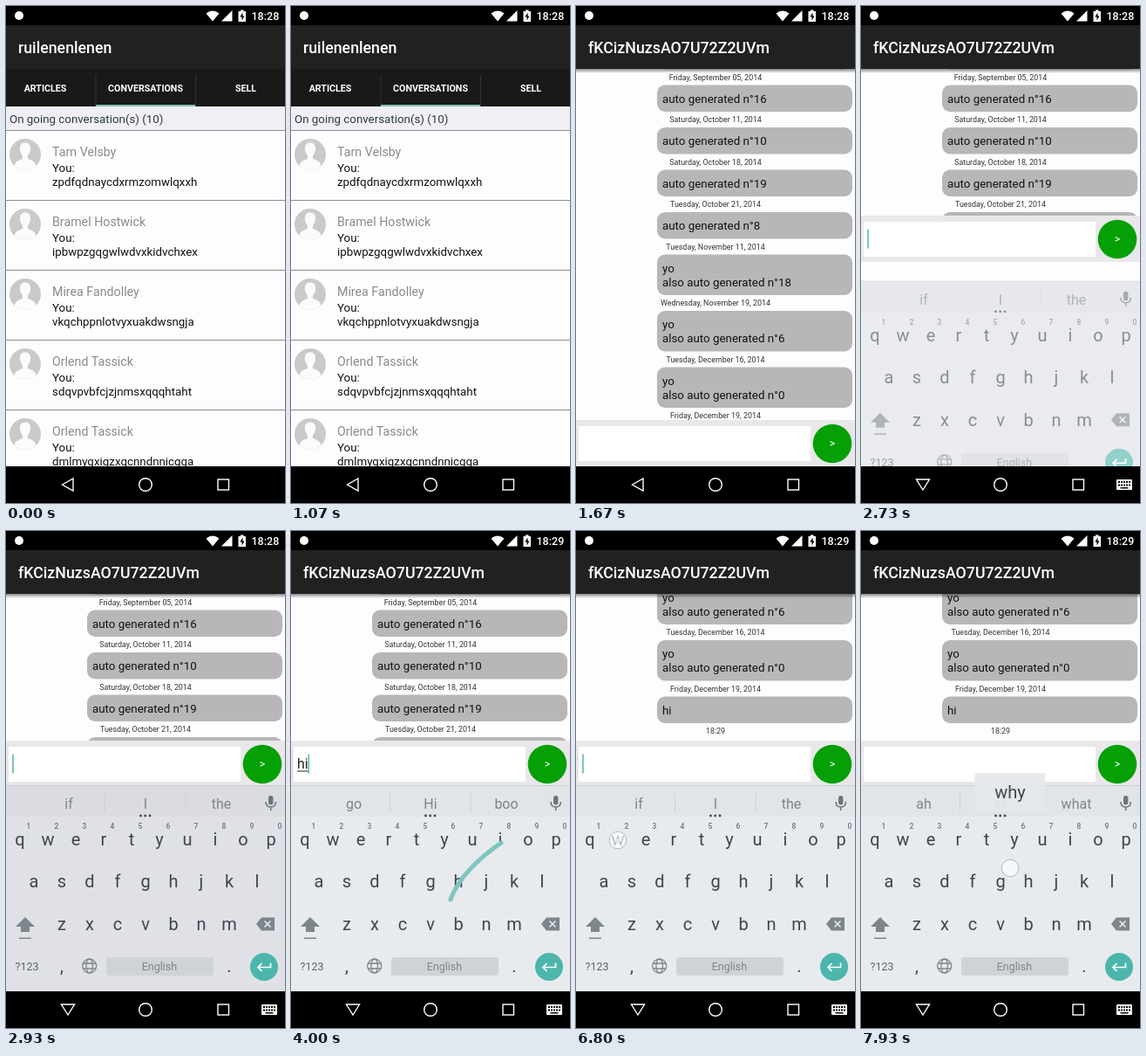
These frames come from a looping animation (320x569 px, 8000 ms). An HTML page:

```html
<!DOCTYPE html>
<html lang="en">
<head>
<meta charset="utf-8">
<title>Chat</title>
<style>
html, body { margin: 0; width: 100%; height: 100%; overflow: hidden; background: #000; }
svg { display: block; width: 100vw; height: 100vh; font-family: Roboto, sans-serif; }
.mid { text-anchor: middle; }
.title { font-size: 17.78px; font-weight: 500; fill: #fff; }
.tab { font-size: 10.67px; font-weight: 700; fill: #fff; text-anchor: middle; }
.msg { font-size: 13.33px; fill: #111; }
.name { font-size: 14.22px; fill: #8b8b8b; }
.date { font-size: 8.89px; fill: #333; text-anchor: middle; }
.key { font-size: 20px; fill: #3b474e; text-anchor: middle; }
.digit { font-size: 8.5px; font-weight: 500; fill: #69757b; text-anchor: middle; }
.word { font-size: 16px; fill: #7b858b; text-anchor: middle; }
.line { fill: none; stroke: #fff; stroke-width: 1.4; }
</style>
</head>
<body>
<svg id="stage" viewBox="0 0 320 569" preserveAspectRatio="none"></svg>
<script>
(() => {
const LOOP = 8000;
const stage = document.getElementById('stage');

const rect = (x, y, w, h, fill, r = 0, more = '') =>
  `<rect x="${x}" y="${y}" width="${w}" height="${h}" rx="${r}" fill="${fill}" ${more}/>`;
const text = (x, y, cls, s, more = '') => `<text x="${x}" y="${y}" class="${cls}" ${more}>${s}</text>`;
const path = (d, more) => `<path d="${d}" ${more}/>`;
const circle = (x, y, r, more) => `<circle cx="${x}" cy="${y}" r="${r}" ${more}/>`;

// Conversation list
const people = [
  ['Tarn Velsby', 'zpdfqdnaycdxrmzomwlqxxh'],
  ['Bramel Hostwick', 'ipbwpzgqgwlwdvxkidvchxex'],
  ['Mirea Fandolley', 'vkqchppnlotvyxuakdwsngja'],
  ['Orlend Tassick', 'sdqvpvbfcjzjnmsxqqqhtaht'],
  ['Orlend Tassick', 'dmlmyqxiqzxgcnndnnicgga']
];

function person([name, msg], i) {
  return `<g transform="translate(0 ${142.5 + i * 80})">` +
    circle(22, 27.5, 18, 'fill="#cacaca"') +
    path('M9.5 40.5Q10 35 19 32.5V29Q15.5 25 16 19.5Q16.5 14 22 14T28 19.5Q28.5 25 25 29V32.5Q34 35 34.5 40.5Q29 45.5 22 45.5T9.5 40.5Z', 'fill="#fbfbfb"') +
    text(53, 29.5, 'name', name) + text(53, 47.5, 'msg', 'You:') + text(53, 63.5, 'msg', msg) +
    rect(0, 79.5, 320, 1, '#8e8e8e') + '</g>';
}

const inbox = rect(0, 22, 320, 505, '#fdfcfe') + people.map(person).join('') +
  rect(0, 22, 320, 50, '#212121') + rect(0, 72, 320, 43, '#191919') +
  text(14, 53.5, 'title', 'ruilenenlenen') +
  text(45, 97.5, 'tab', 'ARTICLES') + text(160, 97.5, 'tab', 'CONVERSATIONS') + text(275, 97.5, 'tab', 'SELL') +
  rect(102.5, 79, 1, 36, '#2b3434') + rect(217, 79, 1, 36, '#2b3434') +
  rect(103, 113, 114, 2, '#86bdb8') +
  rect(0, 115, 320, 27, '#f0eff5') + rect(0, 142, 320, 1, '#8e8e8e') +
  text(4, 134, 'msg', 'On going conversation(s) (10)', 'style="fill:#2c3b42"');

// Messages: number, mine, two lines, date
const chat = [
  [9, 0, 0, 'Monday, January 06, 2014'],
  [17, 0, 1, 'Monday, February 10, 2014'],
  [3, 1, 0, 'Wednesday, February 12, 2014'],
  [13, 0, 0, 'Saturday, February 15, 2014'],
  [14, 0, 0, 'Monday, March 10, 2014'],
  [7, 0, 1, 'Saturday, March 15, 2014'],
  [15, 0, 1, 'Thursday, March 20, 2014'],
  [1, 1, 0, 'Friday, April 11, 2014'],
  [4, 0, 0, 'Tuesday, May 06, 2014'],
  [11, 0, 0, 'Sunday, June 15, 2014'],
  [5, 1, 0, 'Monday, July 21, 2014'],
  [2, 0, 0, 'Thursday, August 14, 2014'],
  [12, 1, 0, 'Friday, September 05, 2014'],
  [16, 1, 0, 'Saturday, October 11, 2014'],
  [10, 1, 0, 'Saturday, October 18, 2014'],
  [19, 1, 0, 'Tuesday, October 21, 2014'],
  [8, 1, 0, 'Tuesday, November 11, 2014'],
  [18, 1, 1, 'Wednesday, November 19, 2014'],
  [6, 1, 1, 'Tuesday, December 16, 2014'],
  [0, 1, 1, 'Friday, December 19, 2014'],
  ['hi', 1, 0, '18:29']
];

let nextY = 75;
const messages = chat.map(([n, mine, two, date]) => {
  const x = mine ? 93 : 3, h = two ? 46.5 : 30.5, y = nextY;
  const said = n === 'hi' ? n : `auto generated n°${n}`;
  nextY += h + 18;
  return rect(x, y, 224, h, mine ? '#b8b6b8' : '#dad9da', 9) +
    (two ? text(x + 6, y + 20, 'msg', 'yo') + text(x + 6, y + 36, 'msg', 'also ' + said) : text(x + 6, y + 20, 'msg', said)) +
    text(160, y + h + 12, 'date', date);
}).join('');

const panel = rect(0, 474, 320, 53, '#e9e7e9') + rect(0, 527, 320, 240, '#fdfcfe') +
  rect(3, 481, 266, 40, '#fff') +
  circle(294, 501, 22.3, 'fill="#05a005"') + text(294, 505, 'mid', '&gt;', 'font-size="12.5" fill="#fff"') +
  `<g id="typed">${text(7, 506, '', 'hi', 'font-size="16" fill="#222"')}${rect(7, 508.5, 13, 1, '#222')}</g>` +
  rect(0, 489.5, 1.6, 22, '#5db9b1', 0, 'id="caret"');

// Keyboard
const keys = (s, x, y) => [...s].map((c, i) => text(x + 32 * i, y, 'key', c)).join('');
const digits = [...'1234567890'].map((c, i) => text(26 + 32 * i, 341, 'digit', c)).join('');
const thin = 'fill="none" stroke="#7c868b" stroke-width="1.3"';

const board = rect(0, 291, 320, 236, '#e7ebee', 0, 'id="base"') +
  rect(0, 291, 320, 36, '#000', 0, 'opacity=".025"') + rect(0, 291, 320, 1, '#c9cccf') +
  [72, 160, 247].map((x, i) => text(x, 318, 'word', '', `id="word${i}"`)).join('') +
  rect(113, 300, 1, 21, '#cbd0d3') + rect(205.5, 300, 1, 21, '#cbd0d3') +
  [154.5, 159.7, 165].map(x => circle(x, 326, 1.4, 'fill="#3b474e"')).join('') +
  rect(301, 303, 5.4, 10.5, '#69757b', 2.7) +
  path('M298 310Q298 316 303.7 316T309.4 310M303.7 316V320', 'fill="none" stroke="#69757b" stroke-width="1.5"') +
  digits + keys('qwertyuiop', 16, 360) + keys('asdfghjkl', 32, 408) + keys('zxcvbnm', 64, 457) +
  path('M22 442L33 453H27V459H17V453H11Z', 'fill="#7c868b"') + rect(15, 465.5, 14, 1.5, '#7c868b') +
  path('M287 450L293 442.5H308V457.5H293Z', 'fill="#7c868b"') +
  path('M296.5 446.5L303.5 453.5M303.5 446.5L296.5 453.5', 'stroke="#eceff1" stroke-width="1.5"') +
  text(24, 503, 'mid', '?123', 'font-size="12.5" fill="#59656b"') +
  text(64, 505, 'key', ',') + text(256, 505, 'key', '.') +
  circle(95.7, 498, 8, thin) + `<ellipse cx="95.7" cy="498" rx="3.8" ry="8" ${thin}/>` +
  path('M88.5 495H103M88.5 501H103', thin) +
  rect(115, 488, 123, 21, '#cfd3d8', 3) + text(176, 503, 'mid', 'English', 'font-size="12.5" fill="#7c868b"') +
  circle(296, 499, 16, 'fill="#4db6ac"') +
  path('M303.5 494.5V499.5H289M293.5 495L289 499.5L293.5 504', 'fill="none" stroke="#fff" stroke-width="1.7"');

const statusBar = rect(0, 0, 320, 22, '#000') + circle(15, 11, 5, 'fill="#fff"') +
  path('M229.5 8.5Q237 2.5 244.5 8.5L237 17.5Z', 'fill="#fff"') +
  path('M247 17.5L259.5 5V17.5Z', 'fill="#fff"') +
  path('M266.5 6H269V4.5H272.5V6H275V18H266.5Z', 'fill="#fff"') +
  path('M271.5 7.5L268.3 12.5H270.5V16.5L273.5 11.5H271.5Z', 'fill="#000"') +
  text(281.5, 15.7, '', '18:28', 'id="clock" font-size="12.5" font-weight="500" fill="#fff"');

const navBar = rect(0, 527, 320, 42, '#000') +
  path('', 'id="back" class="line"') + circle(160, 548, 7.3, 'class="line"') +
  rect(243, 542, 12.5, 12, 'none', 0, 'class="line"') +
  `<g id="ime">${rect(293, 542, 18, 12, '#fff', 1)}` +
  [0, 1, 2, 3, 4].map(i => rect(295 + i * 3, 544, 2, 2, '#000') + rect(295 + i * 3, 547.5, 2, 2, '#000')).join('') +
  rect(297.5, 551, 9, 1.5, '#000') + '</g>';

stage.innerHTML =
  `<defs><linearGradient id="shade" x2="0" y2="1"><stop stop-opacity=".45"/><stop offset="1" stop-opacity="0"/></linearGradient></defs>
  ${inbox}
  <g id="room">${rect(0, 22, 320, 600, '#fdfcfe')}<g id="list">${messages}</g>
    ${rect(0, 22, 320, 50, '#212121')}${rect(0, 72, 320, 5, 'url(#shade)')}
    ${text(14, 53.5, 'title', 'fKCizNuzsAO7U72Z2UVm')}
    <g id="panel">${panel}</g></g>
  <g id="board">${board}</g>
  <polyline id="trail" fill="none" stroke="#7cc3be" stroke-width="5" stroke-linecap="round" stroke-linejoin="round"/>
  <g id="hint">${rect(-40.5, -22, 81, 44, '#e6e9ec', 2, 'opacity=".93"')}${text(0, 7, 'key', '', 'id="guess"')}</g>
  ${circle(0, 0, 9.8, 'id="touch" fill="#fff" fill-opacity=".65" stroke="#b3b8c0"')}
  ${statusBar}${navBar}`;

const el = {};
stage.querySelectorAll('[id]').forEach(n => el[n.id] = n);
const set = (id, k, v) => el[id].setAttribute(k, v);
const show = (id, on) => set(id, 'visibility', on ? 'visible' : 'hidden');
const move = (id, x, y) => set(id, 'transform', `translate(${x} ${y})`);
const ramp = (t, a, b) => Math.min(1, Math.max(0, (t - a) / (b - a)));
const smooth = u => u * u * (3 - 2 * u);
const mix = (a, b, u) => a + (b - a) * u;
const within = (t, spans) => spans.some(([a, b]) => t >= a && t < b);

// Swipe over the keys: h to i
function swipeHi(t) {
  const u = smooth(ramp(t, 3500, 3900)), v = 1 - u;
  return [v * v * 183 + 2 * u * v * 195 + u * u * 241, v * v * 422 + 2 * u * v * 389 + u * u * 357];
}
// w to h, then back towards y
function swipeWhy(t) {
  const u = smooth(ramp(t, 6800, 7430)), w = smooth(ramp(t, 7430, 7650));
  return [mix(48, 190, u) - 19 * w, mix(354, 392, u) - 6 * w];
}

function drawTrail(pos, from, to) {
  const pts = [];
  for (let i = 0; i <= 24; i++) pts.push(pos(mix(from, to, i / 24)).map(n => n.toFixed(1)).join());
  set('trail', 'points', pts.join(' '));
}

const words = t => t >= 7250 ? ['ah', 'et', 'what'] :
  t >= 3930 && t < 4870 ? ['go', 'Hi', 'boo'] : ['if', 'I', 'the'];

function draw(t) {
  const enter = Math.pow(1 - ramp(t, 1110, 1460), 5);
  show('room', t >= 1110);
  set('room', 'opacity', ramp(t, 1110, 1250));
  move('room', 0, 45 * enter);
  move('list', 0, -663 * smooth(ramp(t, 1330, 1650)) - 288.5 * smooth(ramp(t, 4330, 4730)));

  const open = t >= 2670, rise = 1 - Math.pow(1 - ramp(t, 2670, 2900), 3);
  move('panel', 0, open ? -234 : 0);
  show('board', open);
  set('board', 'opacity', rise);
  move('board', 0, 60 * (1 - rise));
  set('base', 'fill', t < 3470 ? '#dfe1e6' : '#e7ebee');
  words(t).forEach((w, i) => el['word' + i].textContent = w);

  const typed = t >= 3930 && t < 4330;
  el.typed.style.display = typed ? '' : 'none';
  el.caret.style.display = within(t, [[2670, 3200], [3730, 4870], [5330, 5870], [6400, 6930], [7470, 7930]]) ? '' : 'none';
  set('caret', 'x', typed ? 19.5 : 7.2);

  const hi = t >= 3500 && t < 4550, why = t >= 6800;
  show('trail', hi || why && t < 7900);
  if (hi) drawTrail(swipeHi, 3500, Math.min(t, 3900));
  if (why) drawTrail(swipeWhy, Math.max(6800, t - 280), t);
  set('trail', 'opacity', hi ? .95 * (1 - ramp(t, 4200, 4500)) : .95 * (1 - ramp(t, 7660, 7900)));

  const down = hi && t < 3930 || why;
  const [x, y] = why ? swipeWhy(t) : swipeHi(t);
  show('touch', down);
  move('touch', x, y);
  show('hint', why ? t >= 7000 : down && t >= 3650);
  move('hint', x, y - 87);
  el.guess.textContent = !why ? 'hi' : t < 7250 ? 'we' : 'why';

  el.clock.textContent = t < 3470 ? '18:28' : '18:29';
  set('back', 'd', open ? 'M63.5 542H78.5L71 554Z' : 'M64.5 548L77 541V555Z');
  show('ime', open);
}

function tick() {
  draw(performance.now() % LOOP);
  requestAnimationFrame(tick);
}
draw(0);
requestAnimationFrame(tick);
})();
</script>
</body>
</html>
```
